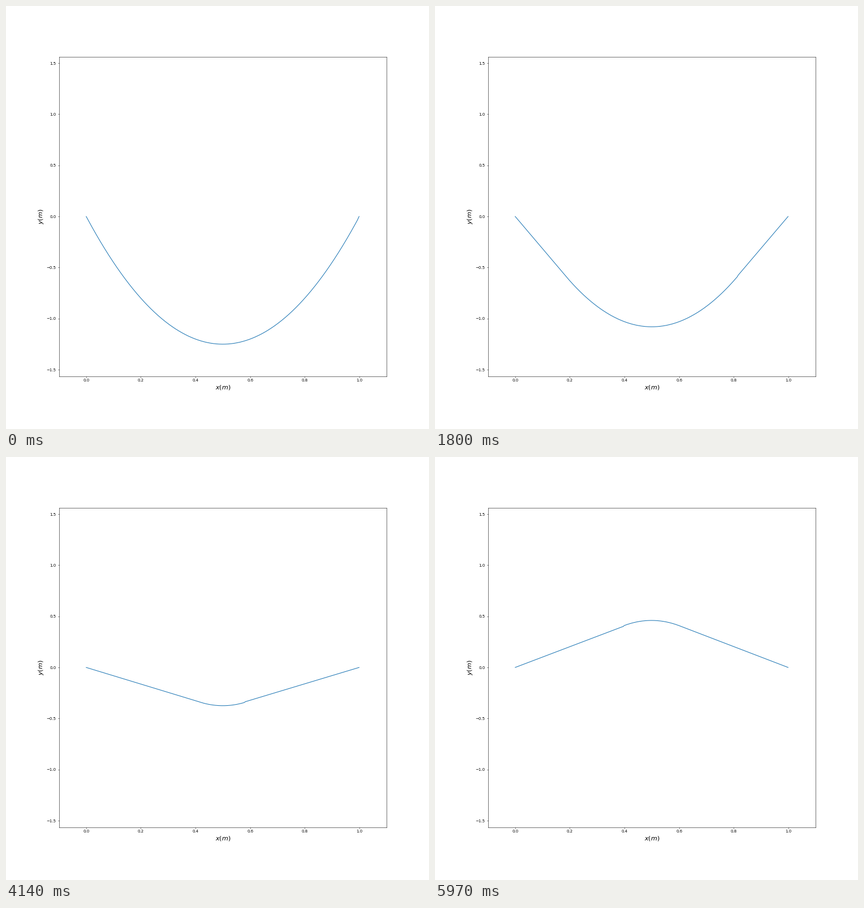
These frames come from a looping animation (748 px wide and 748 px high, 6 s). A matplotlib script:

```python
import numpy as np
import matplotlib.pyplot as plt
from matplotlib.animation import FuncAnimation

DPI = 50
SIZE = 748
FRAMES = 200
INTERVAL = 30

DX = 0.001        # grid spacing
STEP = 0.003      # distance the waves travel per frame
START = 0.0045    # distance already travelled at the first frame

# Plucked string: a parabola held at zero at the last grid point
x = np.arange(1000) * DX
length = x[-1]
shape = 5 * x * (x - 1)
shape[-1] = 0

# One period of the odd extension
ext_x = np.concatenate([x, 2 * length - x[-2::-1]])
ext_y = np.concatenate([shape, -shape[-2::-1]])


def profile(s):
    return np.interp(np.mod(s, 2 * length), ext_x, ext_y)


def string(i):
    """Sum of the two travelling halves, fixed at both ends."""
    d = START + STEP * i
    y = (profile(x - d) + profile(x + d)) / 2
    y[0] = y[-1] = 0
    return y


fig, ax = plt.subplots(figsize=(SIZE / DPI, SIZE / DPI), dpi=DPI)
fig.subplots_adjust(left=0.125, right=0.9, bottom=0.125, top=0.88)
ax.set_xlim(-0.1, 1.1)
ax.set_ylim(-1.5625, 1.5625)
ax.set_xlabel("$x(m)$", fontsize=16)
ax.set_ylabel("$y(m)$", fontsize=16)
line, = ax.plot(x, string(0), color="C0", lw=1.5)


def update(i):
    line.set_ydata(string(i))
    return line,


anim = FuncAnimation(fig, update, frames=FRAMES, interval=INTERVAL,
                     repeat=True, repeat_delay=0)
plt.show()
```
